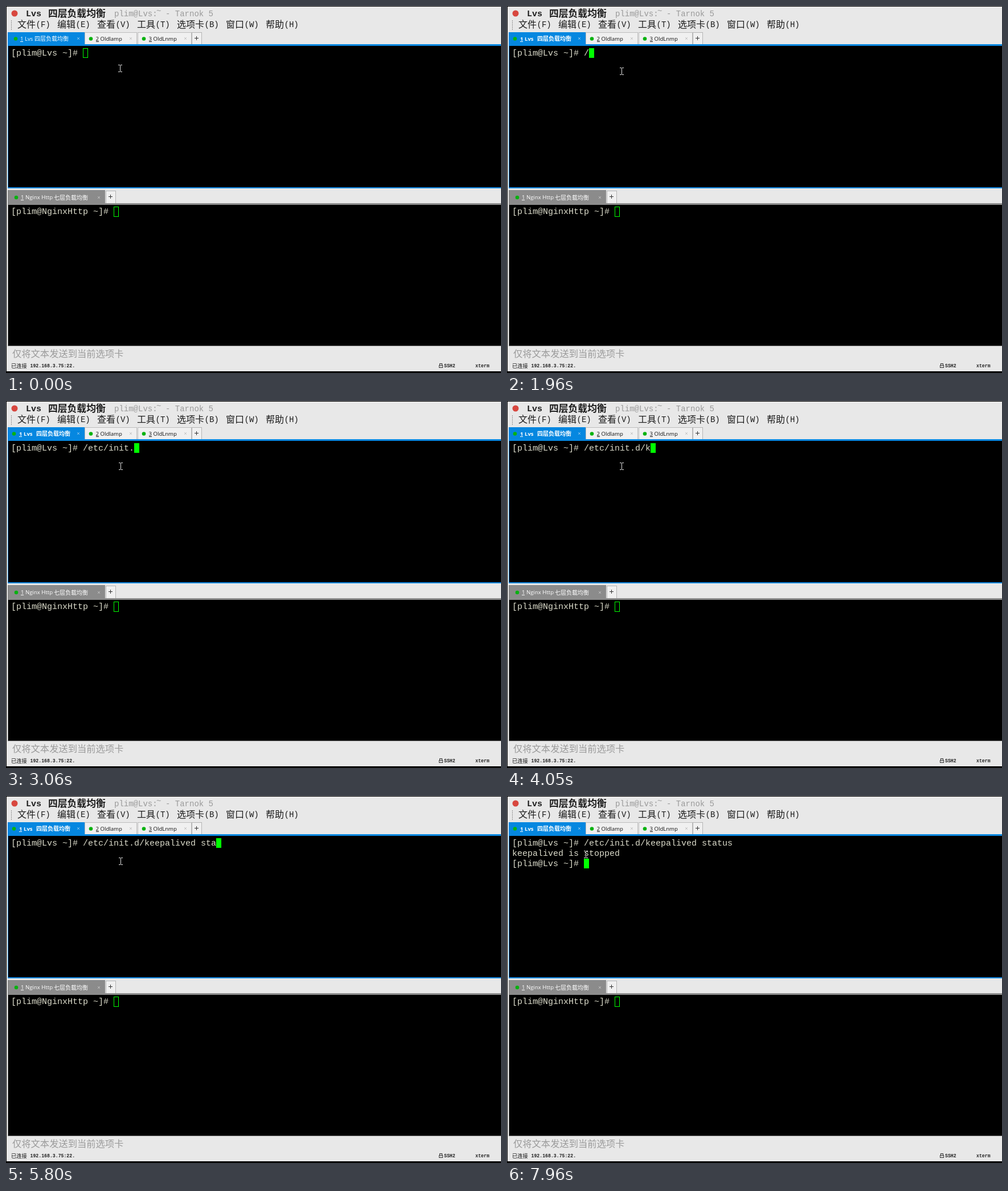
Recreate the animation shown at these times as an HTML page with a canvas. Size 869 px wide and 644 px high, loop 8 s.

```html
<!DOCTYPE html>
<html lang="zh">
<head>
<meta charset="utf-8">
<title>Terminal session</title>
<style>
  html, body { margin: 0; width: 100%; height: 100%; overflow: hidden; background: #000; }
  canvas { display: block; }
</style>
</head>
<body>
<canvas id="stage" width="869" height="644"></canvas>
<script>
const ctx = document.getElementById("stage").getContext("2d");
const LOOP = 8000, CELL = 9, ROW = 18, LEFT = 9;
const MONO = '"Liberation Mono", monospace';
const UI = '"Open Sans", sans-serif';
const CJK = '"Noto Sans CJK SC", "Noto Sans CJK", sans-serif';

const PANEL = "#e8e8e8", BLUE = "#0587e0", GRAY = "#8b8b8b", INK = "#1c1c1c";
const FAINT = "#9a9a9a", GREEN = "#00ff00", DOT = "#08b210", TERM = "#dcdccb";

const PROMPT = "[plim@Lvs ~]# ";
const PROMPT2 = "[plim@NginxHttp ~]# ";
const COMMAND = "/etc/init.d/keepalived status";
const FOCUS = 1060, REPLY = 6370;

// [time, typed characters]
const TYPING = [[0, 0], [1960, 1], [2230, 3], [2380, 5], [2660, 7], [2780, 9],
  [3060, 10], [3490, 11], [3640, 12], [4050, 13], [4200, 14], [4320, 23],
  [5000, 25], [5250, 26], [5670, 25], [5800, 26], [5950, 27], [6090, 28], [6220, 29]];
// [time, left, top]
const POINTER = [[0, 197, 103], [1340, 198, 108], [7430, 182, 104], [7570, 170, 105],
  [7690, 153, 99], [7810, 141, 94], [7960, 135, 96]];

const at = (steps, t) => steps.filter(s => s[0] <= t).pop();

function box(x, y, w, h, color) {
  ctx.fillStyle = color;
  ctx.fillRect(x, y, w, h);
}

function frame(x, y, w, h, color) {
  ctx.strokeStyle = color;
  ctx.lineWidth = 1;
  ctx.strokeRect(x + 0.5, y + 0.5, w - 1, h - 1);
}

function text(str, x, y, font, color) {
  ctx.font = font;
  ctx.fillStyle = color;
  ctx.fillText(str, x, y);
}

function dot(x, y, r, color) {
  ctx.fillStyle = color;
  ctx.beginPath();
  ctx.arc(x, y, r, 0, Math.PI * 2);
  ctx.fill();
}

function cross(x, y, color) {
  ctx.strokeStyle = color;
  ctx.lineWidth = 1;
  ctx.beginPath();
  ctx.moveTo(x - 2, y - 2);
  ctx.lineTo(x + 2, y + 2);
  ctx.moveTo(x + 2, y - 2);
  ctx.lineTo(x - 2, y + 2);
  ctx.stroke();
}

function plusTab(x, y, h) {
  box(x, y, 18, h, "#f0f0f0");
  frame(x, y, 18, h, "#b4b4b4");
  box(x + 5, y + 10, 7, 1, "#333");
  box(x + 8, y + 7, 1, 7, "#333");
}

function tabLabel(num, name, x, y, color, weight = 400) {
  const font = `${weight} 9.6px ${UI}`;
  text(`${num} ${name}`, x, y, font, color);
  box(Math.round(x), y + 1, 5, 1, color);
}

function titleBar() {
  dot(15, 13, 5.5, "#d8473f");
  text("Lvs", 35, 18, `bold 15px ${MONO}`, INK);
  text("四层负载均衡", 74, 19, `bold 16.8px ${CJK}`, INK);
  const font = `14px ${MONO}`;
  text("plim@Lvs:", 190, 18, font, FAINT);
  text("~", 264, 13, font, FAINT);
  text("- Tarnok 5", 280, 18, font, FAINT);
}

function menuBar() {
  for (let y = 25; y < 42; y += 3) box(9, y, 1, 2, "#8f8f8f");
  const items = [["文件", "F", 20], ["编辑", "E", 90], ["查看", "V", 160], ["工具", "T", 230],
    ["选项卡", "B", 300], ["窗口", "W", 386], ["帮助", "H", 456]];
  for (const [label, key, x] of items) {
    text(label, x, 38, `300 16px ${CJK}`, INK);
    text(`(${key})`, x + label.length * 16 + 0.5, 37, `14px ${MONO}`, INK);
  }
}

function topTabs(focused) {
  box(3, 46, 135, 22, BLUE);
  const weight = focused ? 700 : 400;
  dot(focused ? 14 : 17, 57.5, 3.3, DOT);
  tabLabel("1", "Lvs", focused ? 23 : 25, 61, "#fff", weight);
  text("四层负载均衡", focused ? 53 : 50, 61, `${weight} 10px ${CJK}`, "#fff");
  cross(127, 57, "#7fc0ee");

  for (const [x, w, num, name] of [[138, 92, "2", "Oldlamp"], [231, 95, "3", "OldLnmp"]]) {
    box(x, 46, w, 22, "#f0f0f0");
    frame(x, 46, w, 22, "#bcbcbc");
    dot(x + 11, 57.5, 3.3, DOT);
    tabLabel(num, name, x + 19.5, 61, "#111");
    cross(x + w - 11, 57, "#c4c4c4");
  }
  plusTab(326, 46, 22);
  box(3, 67, 866, 3, BLUE);
}

function bottomTabs() {
  box(3, 323, 171, 24, GRAY);
  dot(18, 336, 3.3, DOT);
  tabLabel("1", "Nginx Http", 26, 339, "#fff");
  text("七层负载均衡", 84, 339.5, `10px ${CJK}`, "#fff");
  cross(163, 336, "#bdbdbd");
  plusTab(175, 324, 23);
  box(3, 346, 866, 3, GRAY);
}

function statusBar() {
  text("仅将文本发送到当前选项卡", 11, 615.5, `300 16.3px ${CJK}`, FAINT);
  text("已连接", 9, 634.5, `9.3px ${CJK}`, "#111");
  const font = `bold 8.2px ${MONO}`;
  text("192.168.3.75:22.", 42.5, 634, font, "#222");
  frame(760, 630, 7, 5, "#333");
  frame(761, 627, 5, 4, "#333");
  box(763, 632, 1, 1, "#333");
  text("SSH2", 769, 634, font, "#222");
  text("xterm", 824, 634, font, "#222");
}

function line(str, row) {
  text(str, LEFT, 87 + row * ROW, `15px ${MONO}`, TERM);
}

function typed(t) {
  const str = COMMAND.slice(0, at(TYPING, t)[1]);
  return t >= 5250 && t < 5670 ? str.slice(0, -1) + "r" : str;
}

function session(t) {
  const current = PROMPT + typed(t);
  const done = t >= REPLY;
  line(current, 0);
  if (done) {
    line("keepalived is stopped", 1);
    line(PROMPT, 2);
  }
  const col = done ? PROMPT.length : current.length;
  const x = LEFT + col * CELL, y = 74 + (done ? 2 * ROW : 0);
  if (t < FOCUS) frame(x, y, CELL, 17, GREEN);
  else box(x, y, CELL, 17, GREEN);
}

function pointer(t) {
  const [, x, y] = at(POINTER, t);
  ctx.globalCompositeOperation = "difference";
  for (const dy of [0, 12]) {
    box(x, y + dy, 3, 1, "#e4e4e4");
    box(x + 4, y + dy, 3, 1, "#e4e4e4");
  }
  box(x + 3, y + 1, 1, 11, "#e4e4e4");
  ctx.globalCompositeOperation = "source-over";
}

function draw(t) {
  box(0, 0, 869, 644, "#000");
  box(1, 1, 868, 640, PANEL);
  titleBar();
  menuBar();
  topTabs(t >= FOCUS);
  box(3, 70, 866, 250, BLUE);
  box(4, 70, 865, 248, "#000");
  bottomTabs();
  box(3, 349, 866, 248, GRAY);
  box(4, 349, 865, 247, "#000");
  text(PROMPT2, LEFT, 365, `15px ${MONO}`, TERM);
  frame(LEFT + PROMPT2.length * CELL, 352, CELL, 18, GREEN);
  statusBar();
  session(t);
  pointer(t);
}

const start = performance.now();
function tick() {
  draw((performance.now() - start) % LOOP);
  requestAnimationFrame(tick);
}
tick();
</script>
</body>
</html>
```
